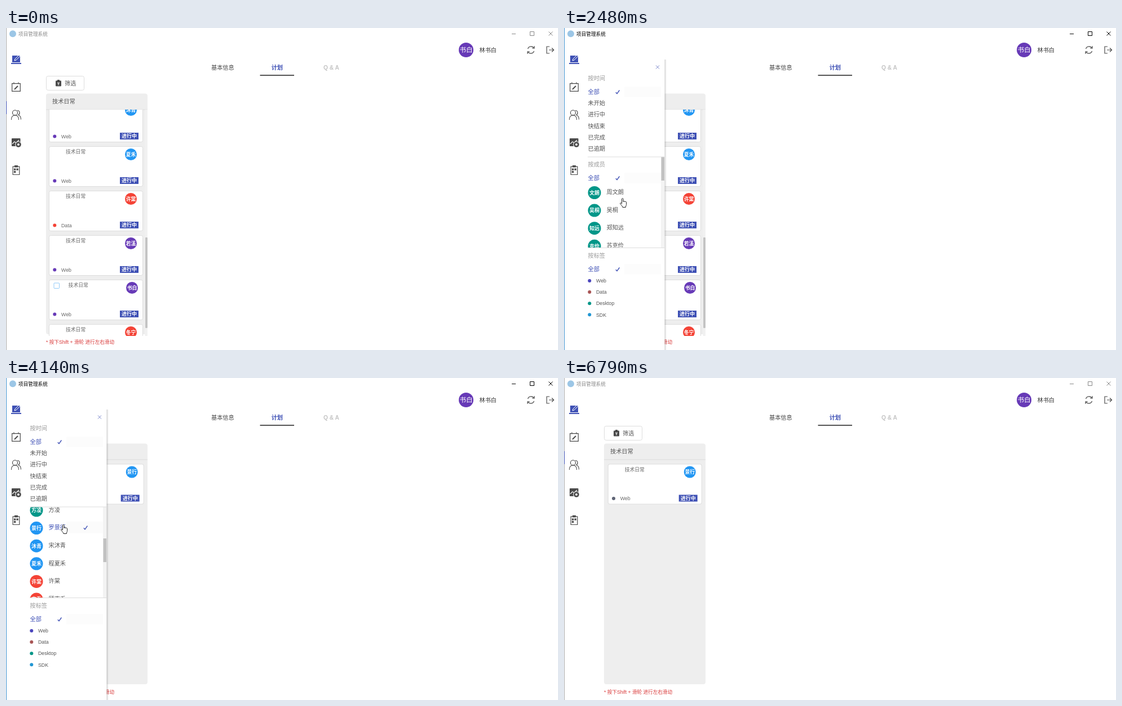
Write an HTML page that moves like this. It is 979 px wide and 572 px high and loops after 6910 ms.

```html
<!DOCTYPE html>
<html lang="zh">
<head>
<meta charset="utf-8">
<style>
html, body { margin: 0; width: 100%; height: 100%; overflow: hidden; background: #fff; }
svg { display: block; font-family: "Liberation Sans", "Noto Sans CJK SC", "Noto Sans CJK", sans-serif; }
text { white-space: pre; }
.line { fill: none; stroke: #4a4a4a; stroke-width: 1.2; }
</style>
</head>
<body>
<svg id="stage" width="979" height="572" viewBox="0 0 979 572"></svg>
<script>
const LOOP = 6910;
const INDIGO = '#3f51b5', TEAL = '#009688', BLUE = '#2196f3', RED = '#f44336', PURPLE = '#673ab7';
const DARK = '#4a4a4a';
const $ = id => document.getElementById(id);

// y is the vertical middle of the text
const text = (x, y, s, size = 10.2, fill = '#555', extra = '') =>
  `<text x="${x}" y="${y + size * .37}" font-size="${size}" fill="${fill}" ${extra}>${s}</text>`;
const rect = (x, y, w, h, fill, extra = '') =>
  `<rect x="${x}" y="${y}" width="${w}" height="${h}" fill="${fill}" ${extra}/>`;
const dot = (x, y, r, fill) => `<circle cx="${x}" cy="${y}" r="${r}" fill="${fill}"/>`;
const line = (d, extra = '') => `<path class="line" d="${d}" ${extra}/>`;
const avatar = (x, y, r, fill, s, size = 8.8, weight = 'bold') =>
  dot(x, y, r, fill) + text(x, y, s, size, '#fff', `text-anchor="middle" font-weight="${weight}"`);
const check = (x, y, id = '') =>
  line(`M${x - 3.2} ${y + .8}l2.2 2.4 4.4-6.2`, `id="${id}" style="stroke:${INDIGO};stroke-width:1.4"`);

function card(y, dx, [color, name, tag, tagColor], picked) {
  const shift = picked ? 2 : 0;
  return rect(76.5 + dx, y + .5, 166, 71, '#fff', 'stroke="#ddd" rx="3"') +
    text(106 + dx + shift * 2.3, y + 10, '技术日常', 8.8, '#666') +
    avatar(221.5 + dx + shift, y + 14.5, 10.5, color, name) +
    dot(86.3 + dx, y + 61.5, 3, tagColor) + text(98 + dx, y + 61.5, tag, 8.8, '#666') +
    rect(202 + dx, y + 55, 33, 12, INDIGO) +
    text(218.5 + dx, y + 61, '进行中', 9, '#fff', 'text-anchor="middle" font-weight="bold"') +
    (picked ? rect(85, y + 6, 9.5, 9.5, '#fff', 'id="box" rx="1"') : '');
}

const cards = [
  [BLUE, '沐青', 'Web', PURPLE], [BLUE, '夏禾', 'Web', PURPLE], [RED, '许棠', 'Data', RED],
  [PURPLE, '若溪', 'Web', PURPLE], [PURPLE, '书白', 'Web', PURPLE], [RED, '冬宁', 'Web', PURPLE]
];
const members = [
  [TEAL, '周文朗'], [TEAL, '吴桐'], [TEAL, '郑知远'], [TEAL, '苏克俭'], [TEAL, '何若川'], [TEAL, '方凌'],
  [BLUE, '罗景行'], [BLUE, '宋沐青'], [BLUE, '程夏禾'], [RED, '许棠'], [RED, '顾南乔'], [RED, '叶知秋']
];
const tags = [['Web', '#4b46bd'], ['Data', '#a85454'], ['Desktop', TEAL], ['SDK', '#2196d3']];
const times = ['未开始', '进行中', '快结束', '已完成', '已逾期'];

const icons =
  // edit
  rect(11, 49, 14, 12, INDIGO) + rect(9, 62, 18, 2, INDIGO) +
  line('M15 58l1-3 7-7 2 2-7 7z', 'style="stroke:#fff;stroke-width:1"') +
  // calendar
  line('M10.7 98.7h14.6v13.6H10.7zM14 96.5v3M22 96.5v3') + line('M15 109l6-6', 'style="stroke-width:2"') +
  // people
  line('M9.5 163c0-6 3-8 6.5-8s6.5 2 6.5 8M20 146.5c5 0 5 6 2 8 3 1 4.5 4 4.5 8') +
  '<circle class="line" cx="16" cy="150.5" r="4.5"/>' +
  // picture settings
  rect(10, 196, 15.5, 14, DARK, 'rx="1"') + line('M11 206l4-4 3 2 5-5', 'style="stroke:#fff"') +
  dot(22, 207, 5.8, '#fff') + dot(22, 207, 4.8, DARK) + dot(22, 207, 2, '#fff') +
  // clipboard
  line('M12.2 246.2h11.6v14.3H12.2z') + rect(15, 244, 6, 3.5, DARK) +
  rect(14, 249.5, 3.3, 3.3, DARK) + rect(18.5, 249.5, 3.3, 3.3, DARK) + rect(14, 254, 3.3, 3.3, DARK) +
  // refresh and log out
  line('M925.5 37a6 6 0 0 1 11-1M936.5 41a6 6 0 0 1-11 1M937 32v4h-4M925 46v-4h4') +
  line('M964 33h-5v12h5M963 39h8M968 35.5l3.5 3.5-3.5 3.5');

const header =
  dot(12, 10.3, 6, '#9cc6e6') +
  `<g id="title">${text(22, 10.5, '项目管理系统', 8.65, 'currentColor')}
  <path d="M897 10.5h7M929.5 6.5h7v7h-7zM962.5 6.5l7 7M969.5 6.5l-7 7" fill="none" stroke="currentColor"/></g>` +
  rect(0, 0, 1, 572, '#aaa', 'id="edge"') + rect(0, 130, 1, 23, INDIGO, 'id="marker"') +
  avatar(816, 39, 13, PURPLE, '书白', 11.5, 'normal') +
  text(839.5, 39.3, '林书白', 10.2, '#333', 'font-weight="500"') +
  text(364, 70, '基本信息', 10.2, '#444') + text(470.7, 70.3, '计划', 10.2, INDIGO, 'font-weight="bold"') +
  text(563, 70, 'Q &amp; A', 10.2, '#c4c4c4', 'font-weight="bold"') + rect(450.5, 83, 60.5, 2, '#555') + icons;

const board =
  rect(71.5, 85.5, 67, 25, '#fff', 'rx="3" stroke="#ddd"') +
  rect(88, 93.5, 10, 10, DARK, 'rx="1"') + rect(91, 92, 4, 3, DARK) +
  line('M91 97.5h4M93 97.5v4', 'style="stroke:#fff"') +
  text(104, 98.5, '筛选') + rect(71, 116.5, 180, 427.5, '#eee', 'rx="4"') +
  text(82, 130, '技术日常') + rect(71, 144.5, 180, 1, '#ddd') +
  `<g id="all" clip-path="url(#listClip)">${cards.map((c, i) => card(131 + 79 * i, 0, c, i === 4)).join('')}
  ${rect(246.5, 145, 4.5, 402, '#f1f1f1')}${rect(247, 372, 4, 161, '#c4c4c4', 'rx="1"')}</g>
  <g id="filtered">${card(152.5, 1.7, [BLUE, '景行', 'Web', '#5f6475'])}</g>` +
  text(71, 558, '* 按下Shift + 滑轮 进行左右滑动', 8.6, '#d93a3a');

const allRow = y => rect(107, y - 9, 65, 18, '#fcfcfc') + text(42.5, y, '全部', 10.2, INDIGO) + check(95, y);
const memberRow = ([color, name], i) => {
  const y = 292 + 31.6 * i, chosen = i === 6;
  return (chosen ? rect(107, y - 11, 65, 21, '#fbfbfb', 'id="chosenBg"') : '') +
    avatar(54, y + .5, 11.5, color, name.slice(-2), 9) +
    text(75.5, y - .5, name, 10.2, '#555', chosen ? 'id="chosen"' : '') + (chosen ? check(141, y - .5, 'tick') : '');
};

const panel =
  rect(30, 50, 148.5, 530, '#fff', 'style="filter:drop-shadow(1px 0 1.5px #0004)"') +
  line('M163 66.5l6 6M169 66.5l-6 6', 'style="stroke:#7986cb;stroke-width:1"') +
  text(42.5, 89.5, '按时间', 10.2, '#999') + allRow(113.5) +
  times.map((s, i) => text(42.5, 133.5 + 20.2 * i, s)).join('') +
  `<g clip-path="url(#memberClip)"><g id="members">${text(42.5, 242.5, '按成员', 10.2, '#999')}${allRow(266.5)}
  ${members.map(memberRow).join('')}</g>${rect(172, 229, 6, 161, '#f3f3f3')}
  ${rect(172.5, 229, 5.5, 42, '#c1c1c1', 'id="thumb"')}</g>` +
  rect(42, 228.5, 136, 1, '#ddd') + rect(42, 390, 136, 1, '#ddd') +
  text(42.5, 404.5, '按标签', 10.2, '#999') + allRow(428.5) +
  tags.map(([s, c], i) => dot(45.3, 449 + 20.1 * i, 3, c) + text(57, 449 + 20.1 * i, s, 8.8)).join('');

$('stage').innerHTML =
  `<defs><clipPath id="listClip">${rect(71, 145, 181, 402)}</clipPath>
  <clipPath id="memberClip">${rect(37, 229, 142, 161)}</clipPath>
  <clipPath id="panelClip">${rect(37, 56, 160, 516)}</clipPath></defs>` +
  rect(0, 0, 979, 572, '#fff') + header + board +
  `<g clip-path="url(#panelClip)"><g id="panel">${panel}</g></g>
  <g id="cursor" fill="#fff" stroke="#222" stroke-linejoin="round">
  <path id="arrow" d="M.5.5v12l2.8-2.6 2 4.2 1.9-.8-2-4h3.7z"/>
  <path id="hand" d="M3.5 10V2c0-2 2.5-2 2.5 0v4.5c0-1.3 2-1.2 2 .2 0-1.2 1.9-1 1.9.3 0-1 1.7-.8 1.7.5v4c0 2-1.3 2.5-1.3 5H5c0-2-2.8-4-4.3-6.5-.6-1.5 1-1.8 2.8 0z"/></g>`;

// time, x, y
const pointer = [
  [70, 861, 552], [150, 690, 470], [310, 330, 300], [470, 70, 140], [560, 8, 110], [690, 40, 112],
  [860, 40, 112], [1000, 88, 120], [1080, 98, 103], [1320, 99, 103], [1460, 100, 115], [1700, 98, 189],
  [1940, 70, 260], [2100, 51, 280], [2330, 51, 280], [2480, 99, 302], [2960, 99, 302], [3350, 99, 276],
  [3730, 99, 276], [3820, 97, 260], [4370, 97, 260], [5060, 172, 56], [5360, 166, 74], [5530, 166, 74],
  [6150, 875, 543], [6230, 889, 554]
];
const clamp = v => Math.max(0, Math.min(1, v));
const ease = (t, a, b) => { const p = clamp((t - a) / (b - a)); return p * p * (3 - 2 * p); };
const show = (id, on) => $(id).style.display = on ? '' : 'none';

function pointerAt(t) {
  const i = pointer.findIndex(p => p[0] > t);
  if (i < 1) return pointer[i < 0 ? pointer.length - 1 : 0].slice(1);
  const [t0, x0, y0] = pointer[i - 1], [t1, x1, y1] = pointer[i];
  const p = (t - t0) / (t1 - t0);
  return [x0 + (x1 - x0) * p, y0 + (y1 - y0) * p];
}

function draw(t) {
  const active = t >= 1160 && t < 6790;
  $('title').style.color = active ? '#000' : '#888';
  $('edge').setAttribute('fill', active ? '#3f92d2' : '#aaa');
  show('marker', !active);
  $('box').setAttribute('stroke', t < 70 ? '#90caf9' : '#ddd');
  show('all', t < 4140);
  show('filtered', t >= 4140);

  const open = ease(t, 1220, 1460) - ease(t, 5530, 5770);
  show('panel', open > 0);
  $('panel').setAttribute('transform', `translate(${(open - 1) * 150} 0)`);
  const scroll = ease(t, 2700, 2950);
  $('members').setAttribute('transform', `translate(0 ${-215.5 * scroll})`);
  $('thumb').setAttribute('y', 229 + 56 * scroll);
  $('chosen').setAttribute('fill', t >= 3820 ? INDIGO : '#555');
  show('chosenBg', t >= 3820);
  show('tick', t >= 4140);

  const [x, y] = pointerAt(t);
  const onButton = t > 1000 && t < 1320 && y < 111;
  const onMember = open === 1 && y > 229 && y < 390 && x < 172;
  const onClose = open > 0 && Math.hypot(x - 166, y - 70) < 8;
  const hand = onButton || onMember || onClose;
  show('cursor', t >= 70 && t < 6320);
  show('hand', hand);
  show('arrow', !hand);
  $('cursor').setAttribute('transform', `translate(${x} ${y})`);
}

const start = performance.now();
function tick() {
  draw((performance.now() - start) % LOOP);
  requestAnimationFrame(tick);
}
tick();
</script>
</body>
</html>
```
